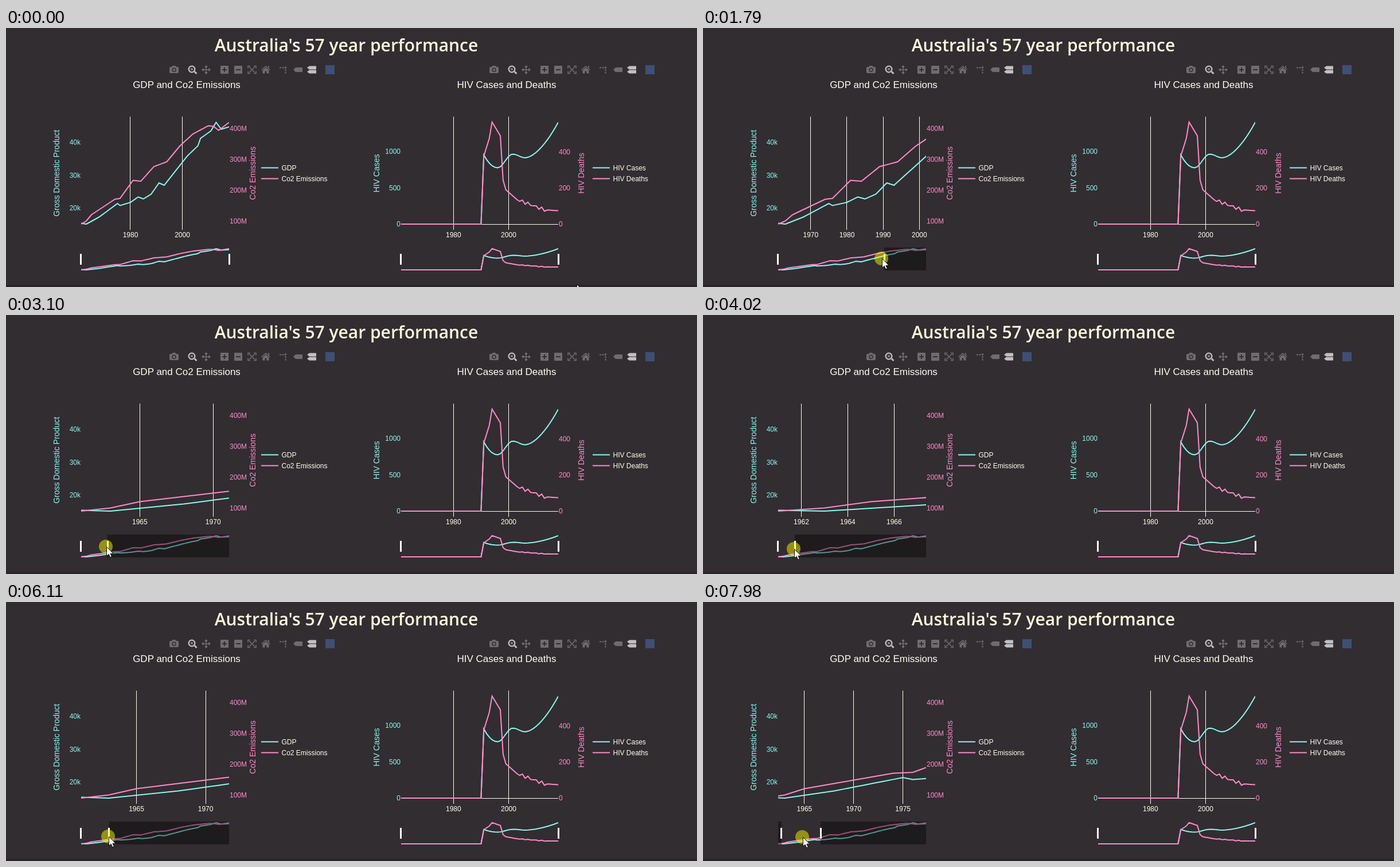
An HTML page that plays this animation: 1205 px wide and 453 px high, repeating every 8000 ms.

```html
<!DOCTYPE html>
<html lang="en">
<head>
<meta charset="utf-8">
<title>57 year performance</title>
<style>
  html, body { margin: 0; width: 100%; height: 100%; overflow: hidden; background: #322d31; }
  svg { display: block; width: 1205px; height: 453px; font-family: "Liberation Sans", Arial, sans-serif; font-size: 12px; }
  h1 { position: absolute; left: 0; top: 0; width: 1187px; margin: 0; text-align: center; white-space: nowrap;
       font: 600 30px/60px "Open Sans", "Noto Sans", sans-serif; color: #fff8dc; }
  .line { fill: none; stroke-width: 2; }
  .grid { fill: none; stroke: #fffde8; shape-rendering: crispEdges; }
</style>
</head>
<body>
<h1>Australia's 57 year performance</h1>
<svg id="stage" viewBox="0 0 1205 453"></svg>
<script>
const NS = "http://www.w3.org/2000/svg";
const CREAM = "#ffffec", CYAN = "#89f8f2", PINK = "#ff8acb";
const FIRST = 1961, SPAN = 57, LOOP = 8000, FRAME = 77.4;
const TOP = 155, BOTTOM = 353, MINI_TOP = 384, MINI_H = 40;
const stage = document.getElementById("stage");

function add(parent, tag, attrs = {}, text) {
  const el = document.createElementNS(NS, tag);
  for (const k in attrs) el.setAttribute(k, attrs[k]);
  if (text !== undefined) el.textContent = text;
  parent.append(el);
  return el;
}
const label = (text, x, y, fill, anchor = "start", size = 12, parent = stage) =>
  add(parent, "text", { x, y, fill, "text-anchor": anchor, "font-size": size }, text);
const upright = (text, x, fill) =>
  add(stage, "text", { transform: `translate(${x} 254) rotate(-90)`, fill, "text-anchor": "middle", "font-size": 14 }, text);

// Curves: turning points [years since the first, height], each reached with an optional easing.
const linear = u => u, rise = u => u ** 1.7, settle = u => 1 - (1 - u) ** 2, wave = u => (1 - Math.cos(Math.PI * u)) / 2;

function yearly(points, wobble = () => 0) {
  return Array.from({ length: SPAN + 1 }, (_, i) => {
    const k = Math.max(1, points.findIndex(p => p[0] >= i));
    const [x0, y0] = points[k - 1], [x1, y1, ease = linear] = points[k];
    return y0 + (y1 - y0) * ease((i - x0) / (x1 - x0)) + wobble(i);
  });
}

const gdp = yearly([[0, 341.5], [2, 343], [7, 330.5], [14, 307], [15, 310.5], [19, 305], [22, 295.5], [24, 299], [27, 290.5],
  [30, 271], [32, 275], [41, 223.5], [45, 206], [46, 193], [50, 180], [52, 165], [54, 177], [57, 173]]);
const co2 = yearly([[0, 343], [2, 337.5], [4, 326.5], [13, 299.5], [15, 298], [20, 266.5], [23, 268], [28, 242.5], [33, 234],
  [38, 206.5], [43, 185.5], [49, 171], [51, 172], [53, 179], [57, 165]]);
const cases = yearly([[0, 343], [29, 343], [30, 222], [35, 244.5, settle], [40.5, 220.5, wave], [45, 227, wave], [57, 165, rise]]);
const deaths = yearly([[0, 343], [29, 343], [30, 224], [32, 193], [33, 164.5], [36, 188.5], [37, 266], [38, 283], [42, 300],
  [52, 318], [57, 319.5]], i => i > 42 && i < 53 ? 3 * Math.cos(2.6 * (i - 45)) : 0);

function tickStep(range) {
  const rough = range / 5, base = 10 ** Math.floor(Math.log10(rough));
  return base * [1, 2, 5, 10].find(m => rough / base <= m + 1e-9);
}

function makeChart({ x0, x1, a, b, zero }) {
  const w = x1 - x0, id = "clip" + x0;
  const clip = add(stage, "clipPath", { id });
  add(clip, "rect", { x: x0, y: TOP, width: w, height: MINI_TOP + MINI_H - TOP });
  const grid = add(stage, "path", { class: "grid" });
  if (zero) add(stage, "path", { class: "grid", d: `M${x0} 343.5H${x1}` });
  const ticks = add(stage, "g");
  const body = add(stage, "g", { "clip-path": `url(#${id})` });
  const curve = stroke => add(body, "path", { class: "line", stroke });
  const main = [curve(CYAN), curve(PINK)], mini = [curve(CYAN), curve(PINK)];
  const mask = () => add(body, "rect", { y: MINI_TOP, height: MINI_H, opacity: .4 });
  const handle = () => add(stage, "rect", { y: 395, width: 3, height: 19, fill: "#fff" });
  const masks = [mask(), mask()], handles = [handle(), handle()];
  const trace = (ys, fx, fy) => "M" + ys.map((y, i) => `${fx(i).toFixed(2)} ${fy(y).toFixed(2)}`).join("L");

  [a, b].forEach((ys, k) => mini[k].setAttribute("d",
    trace(ys, i => x0 + i * w / SPAN, y => 386 + (y - 165) * 37 / 178)));

  return (left, right) => {
    const from = (left - x0) * SPAN / w, range = (right - left) * SPAN / w;
    const fx = i => x0 + (i - from) * w / range;
    [a, b].forEach((ys, k) => main[k].setAttribute("d", trace(ys, fx, y => y)));

    const step = tickStep(range), lines = [];
    ticks.replaceChildren();
    for (let yr = Math.ceil((FIRST + from) / step - 1e-9) * step; yr <= FIRST + from + range; yr += step) {
      const x = fx(yr - FIRST);
      if (x > x0 + 1) lines.push(`M${Math.round(x - .6) + .5} ${TOP}V${BOTTOM}`);
      label(yr, x, 366, CREAM, "middle", 12, ticks);
    }
    grid.setAttribute("d", lines.join(""));

    masks[0].setAttribute("x", x0);
    masks[0].setAttribute("width", left - x0);
    masks[1].setAttribute("x", right);
    masks[1].setAttribute("width", x1 - right);
    handles[0].setAttribute("x", Math.round(left) - 2);
    handles[1].setAttribute("x", Math.round(right) - 1);
  };
}

function legend(x, names) {
  names.forEach((name, i) => {
    const y = 244.5 + 19 * i;
    add(stage, "path", { class: "line", stroke: i ? PINK : CYAN, d: `M${x} ${y}h30` });
    label(name, x + 35.5, y + 4.2, CREAM);
  });
}

function toolbar(dx) {
  const g = add(stage, "g", { transform: `translate(${dx} 0)`, fill: "#fff", "fill-rule": "evenodd" });
  const icon = (d, opacity = .3) => add(g, "path", { d, opacity });
  const stroke = (d, width, dash = "none") =>
    add(g, "path", { d, fill: "none", stroke: "#fff", "stroke-width": width, opacity: .3, "stroke-dasharray": dash });
  const ring = (x, y, r) => `M${x - r} ${y}a${r} ${r} 0 1 0 ${2 * r} 0a${r} ${r} 0 1 0 ${-2 * r} 0z`;
  const box = x => `M${x - 6} 66h12q1 0 1 1v12q0 1-1 1h-12q-1 0-1-1v-12q0-1 1-1z`;
  const tag = (x, y, h) => `M${x} ${y}l4 ${-h / 2}h11q1 0 1 1v${h - 2}q0 1-1 1h-11z`;

  icon("M285 70q0-2 2-2h2.5l1-2h5l1 2h2.5q2 0 2 2v7q0 2-2 2h-12q-2 0-2-2z" + ring(293, 73.3, 3.7) + ring(293, 73.3, 2.2));
  icon(ring(324, 72, 6.5) + ring(324, 72, 4.2) + "M327.5 77l2-2 4 4-2 2z", .7);
  icon("M322 70h4v4h-4z", .35);
  stroke("M349 67.5v11M343.5 73h11", 1.6);
  icon("M349 65l3 3.5h-6zM349 81l3-3.5h-6zM341 73l3.5-3v6zM357 73l-3.5-3v6z");
  icon(box(381) + "M380 69h2v3h3v2h-3v3h-2v-3h-3v-2h3z");
  icon(box(405) + "M401 72h8v2h-8z");
  stroke("M424 68l10 10M434 68l-10 10", 1.5);
  stroke("M422 70.5v-4h4M432 66.5h4v4M436 75.5v4h-4M426 79.5h-4v-4", 1.6);
  icon("M453 66l8 7-1 1-7-6-7 6-1-1zM457 66.5h2v4l-2-1.7zM447.5 74l5.5-4.7 5.5 4.7v5.5h-4v-4h-3v4h-4z");
  stroke("M477 69.5h9M487.5 72v8", 2, "3 1.5");
  icon(ring(487.5, 69, 1.8));
  icon(tag(501, 73, 8));
  icon(tag(525, 69.5, 6) + tag(525, 76.5, 6), .7);
  add(g, "rect", { x: 557, y: 65, width: 16, height: 16, fill: "#3f4f75" });
}

// Static parts
add(stage, "rect", { y: 449, width: 1205, height: 4, fill: "#2a2629" });
toolbar(0);
toolbar(558);
label("GDP and Co2 Emissions", 315, 105, CREAM, "middle", 17);
label("HIV Cases and Deaths", 873, 105, CREAM, "middle", 17);
const scale = (names, x, y, gap, fill, anchor) => names.forEach((s, i) => label(s, x, y + gap * i, fill, anchor));
scale(["40k", "30k", "20k"], 130, 204.3, 57.5, CYAN, "end");
scale(["400M", "300M", "200M", "100M"], 390, 180.3, 54, PINK, "start");
scale(["1000", "500", "0"], 688, 220.3, 63.5, CYAN, "end");
scale(["400", "200", "0"], 964, 221.3, 63, PINK, "start");
upright("Gross Domestic Product", 93, CYAN);
upright("Co2 Emissions", 434.5, PINK);
upright("HIV Cases", 651, CYAN);
upright("HIV Deaths", 1008, PINK);
legend(445, ["GDP", "Co2 Emissions"]);
legend(1023, ["HIV Cases", "HIV Deaths"]);

const drawLeft = makeChart({ x0: 131, x1: 389, a: gdp, b: co2 });
makeChart({ x0: 689, x1: 963, a: cases, b: deaths, zero: true })(689, 963);

// Pointer
const spot = add(stage, "circle", { r: 12, fill: "#ff0", opacity: .48 });
const pointer = add(stage, "path", { stroke: "#000", "stroke-width": .9, fill: "#fff" });
const arrow = "M0 0V16L3.7 12.7L6.2 18.3L8.8 17.2L6.4 11.7H11.5Z";
const HOVER = { shape: arrow };
const PRESS = { shape: arrow, spot: true };
const PAN = { shape: arrow, spot: true, pan: true };
const SPLIT = { shape: "M-3 -9h2v18h-2zM1 -9h2v18h-2zM-10 0l4-4v3h3v2h-3v3zM10 0l-4-4v3h-3v2h3v3z" };
const SLIDE = { shape: "M-10.5 0L-6 -4V-1H6V-4L10.5 0L6 4V1H-6V4Z" };
const PAN_START = 168;

// time, pointer x, pointer y, right handle, mode
const keys = [
  [0, 995, 448, 389, HOVER],
  [500, 570, 345, 389, HOVER],
  [840, 390, 402, 389, SPLIT],
  [1150, 389, 402, 389, PRESS],
  [1315, 378, 404, 384, PRESS],
  [2244, 246, 402, 248, PRESS],
  [2800, 180, 404, 182, PRESS],
  [4018, 159, 409, 160, PRESS],
  [4400, 152, 409, 152, PRESS],
  [5560, 152, 409, 152, PRESS],
  [6430, 195, 411, 195, PRESS],
  [6660, 195, 411, 195, PRESS],
  [6810, 199, 411, 199, PRESS],
  [6960, 199, 411, 199, SPLIT],
  [7040, 170, 411, 199, SLIDE],
  [7420, PAN_START, 410, 199, PAN],
  [7640, PAN_START, 410, 199, PAN],
  [7960, 174, 411, 199, PAN],
  [LOOP, 174, 411, 199, PAN]
];

function poseAt(t) {
  const i = keys.findLastIndex(k => k[0] <= t);
  const p = keys[i], q = keys[i + 1];
  const mix = n => p[n] + (q[n] - p[n]) * (t - p[0]) / (q[0] - p[0]);
  const x = mix(1), mode = p[4], shift = mode.pan ? x - PAN_START : 0;
  return { x: Math.round(x), y: Math.round(mix(2)), left: 131 + shift, right: mix(3) + shift, mode };
}

let shown = -1;
function tick() {
  const now = Math.floor((performance.now() % LOOP + 12) / FRAME) * FRAME;
  if (now !== shown) {
    shown = now;
    const { x, y, left, right, mode } = poseAt(now);
    drawLeft(left, right);
    spot.setAttribute("cx", x - 1);
    spot.setAttribute("cy", y);
    spot.setAttribute("visibility", mode.spot ? "visible" : "hidden");
    pointer.setAttribute("d", mode.shape);
    pointer.setAttribute("transform", `translate(${x + .5} ${y + .5})`);
  }
  requestAnimationFrame(tick);
}
tick();
</script>
</body>
</html>
```
